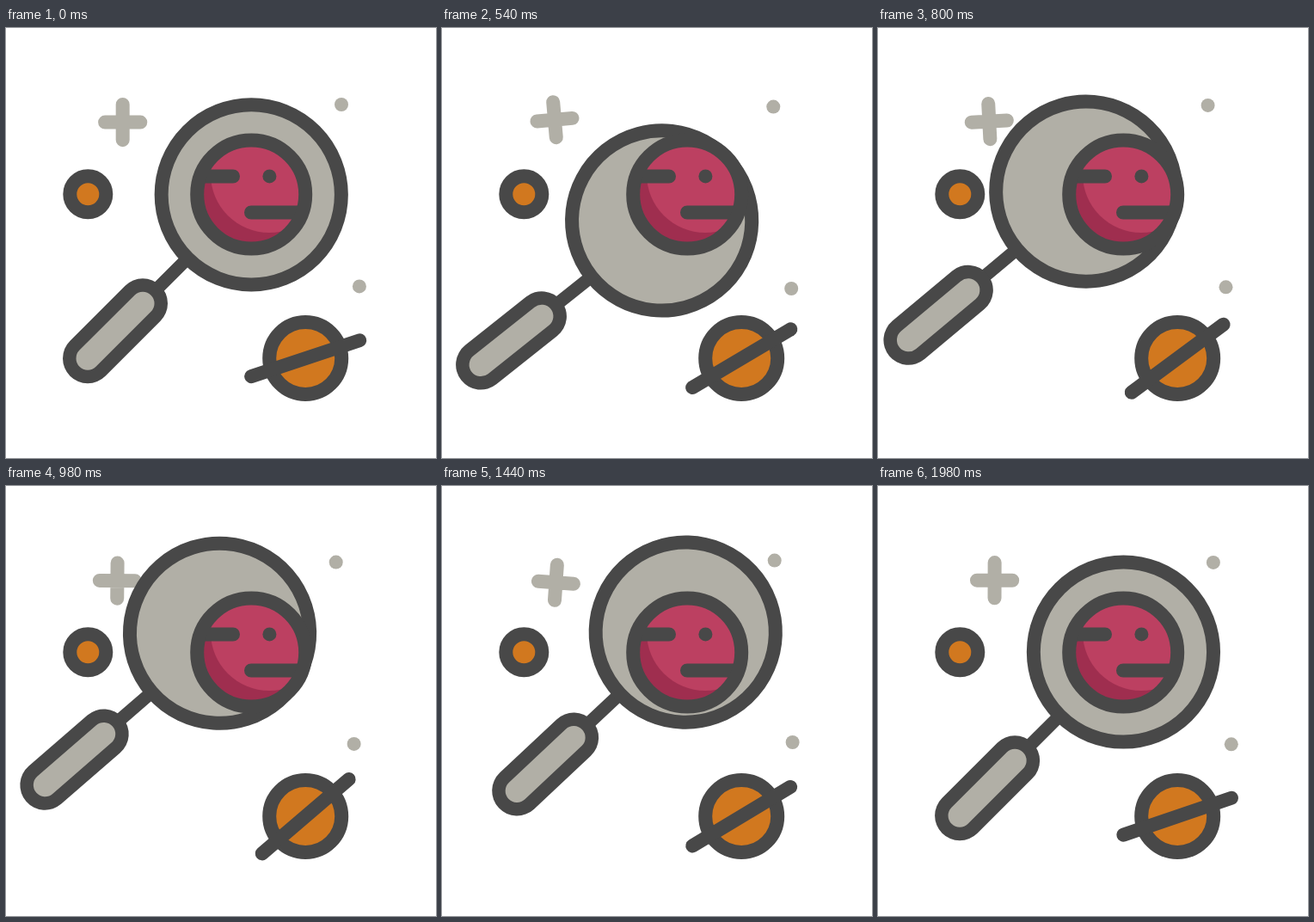
Animation of 500 by 500 pixels, one loop 2000 ms. Source, as an HTML page:

```html
<!DOCTYPE html>
<html lang="en">
<head>
<meta charset="utf-8">
<title>Planet search</title>
<style>
  html, body { margin: 0; width: 100%; height: 100%; overflow: hidden; background: #fff; }
  svg { display: block; width: 100vw; height: 100vh; }
  .line { fill: none; stroke: #484848; stroke-width: 16; stroke-linecap: round; }
  .dark { fill: #484848; }
  .grey { fill: #b1afa6; }
  .orange { fill: #d1781f; }
  .cross { fill: none; stroke: #b1afa6; stroke-width: 16; stroke-linecap: round; }
</style>
</head>
<body>
<svg viewBox="0 0 500 500">
  <defs>
    <clipPath id="disc"><circle cx="285.2" cy="193.5" r="63"/></clipPath>
  </defs>

  <path id="plus" class="cross" d="M-20.6 0H20.6M0 -20.6V20.6"/>
  <circle id="dotA" class="grey" r="8"/>
  <circle id="dotB" class="grey" r="8"/>

  <circle class="line orange" style="fill:#d1781f" cx="95.3" cy="193.3" r="21"/>

  <circle class="line" style="fill:#d1781f" cx="348.2" cy="384" r="42"/>
  <path id="ring" class="line" d="M-66.4 0H66.4"/>

  <g id="glass">
    <path class="line" style="stroke-width:15" d="M-74 74L-112 112"/>
    <path class="line" style="stroke-width:58" d="M-126.2 126.4L-190.2 190.4"/>
    <path class="cross" style="stroke-width:27" d="M-126.2 126.4L-190.2 190.4"/>
    <circle class="line" style="fill:#b1afa6" r="104.6"/>
  </g>

  <g clip-path="url(#disc)">
    <circle cx="285.2" cy="193.5" r="63" fill="#9f2e4f"/>
    <circle cx="306" cy="170" r="68" fill="#bc4061"/>
    <path class="line" d="M222 172.5H264M285 214.5H348"/>
    <circle class="dark" cx="306.4" cy="172.4" r="8"/>
  </g>
  <circle class="line" cx="285.2" cy="193.5" r="63"/>
</svg>
<script>
  const LOOP = 2000;

  // Rows: time, x, y, rotation
  const sweep = [
    [0, 0, 0, 0],
    [260, -10.6, 30.3, 3.7],
    [400, -20.3, 34.5, 5.4],
    [540, -29.6, 30.3, 6.5],
    [800, -43.5, -3.5, 5.1],
    [1100, -28, -29.3, 3.4],
    [1180, -21.5, -29.8, 3],
    [1440, -2.1, -23.6, 1.8],
    [1630, 2.6, -13.5, 1],
    [2000, 0, 0, 0]
  ];
  const drift = [
    [0, 0, 0, 0],
    [260, -1.3, 2.4, -3],
    [540, -4.7, 2.6, -5],
    [800, -6.4, 0.9, -3],
    [1180, -5.3, -1.7, 4],
    [1440, -3.3, -2.4, 4],
    [2000, 0, 0, 0]
  ];

  const slope = (a, b, k) => (b[k] - a[k]) / (b[0] - a[0]);

  function tangent(rows, i, k) {
    const p = rows[i - 1], c = rows[i], n = rows[i + 1];
    if (!p) return slope(c, n, k);
    if (!n) return slope(p, c, k);
    const before = c[0] - p[0], after = n[0] - c[0];
    return (slope(p, c, k) * after + slope(c, n, k) * before) / (before + after);
  }

  // Cubic Hermite curve through the rows
  function sample(rows, t) {
    let i = 0;
    while (t >= rows[i + 1][0]) i++;
    const a = rows[i], b = rows[i + 1], d = b[0] - a[0], u = (t - a[0]) / d;
    const ease = u * u * (3 - 2 * u);
    return [1, 2, 3].map(k =>
      a[k] + (b[k] - a[k]) * ease +
      d * u * (1 - u) * ((1 - u) * tangent(rows, i, k) - u * tangent(rows, i + 1, k)));
  }

  function place(id, x, y, angle = 0) {
    document.getElementById(id).setAttribute("transform", `translate(${x} ${y}) rotate(${angle})`);
  }

  function draw(now) {
    const t = now % LOOP;
    const [gx, gy, turn] = sample(sweep, t);
    const [dx, dy, tilt] = sample(drift, t);
    place("glass", 285.3 + gx, 193.7 + gy, turn);
    place("plus", 135.7 + dx, 109.6 - dy * 1.12, tilt);
    place("dotA", 390 + dx, 89 + dy);
    place("dotB", 410.9 + dx, 300.4 + dy);
    const swing = 1 - Math.abs(t / 1000 - 1);
    place("ring", 348.2, 384.2, -18.4 - 22.6 * swing);
  }

  const start = performance.now();
  function tick() {
    draw(performance.now() - start);
    requestAnimationFrame(tick);
  }
  tick();
</script>
</body>
</html>
```
